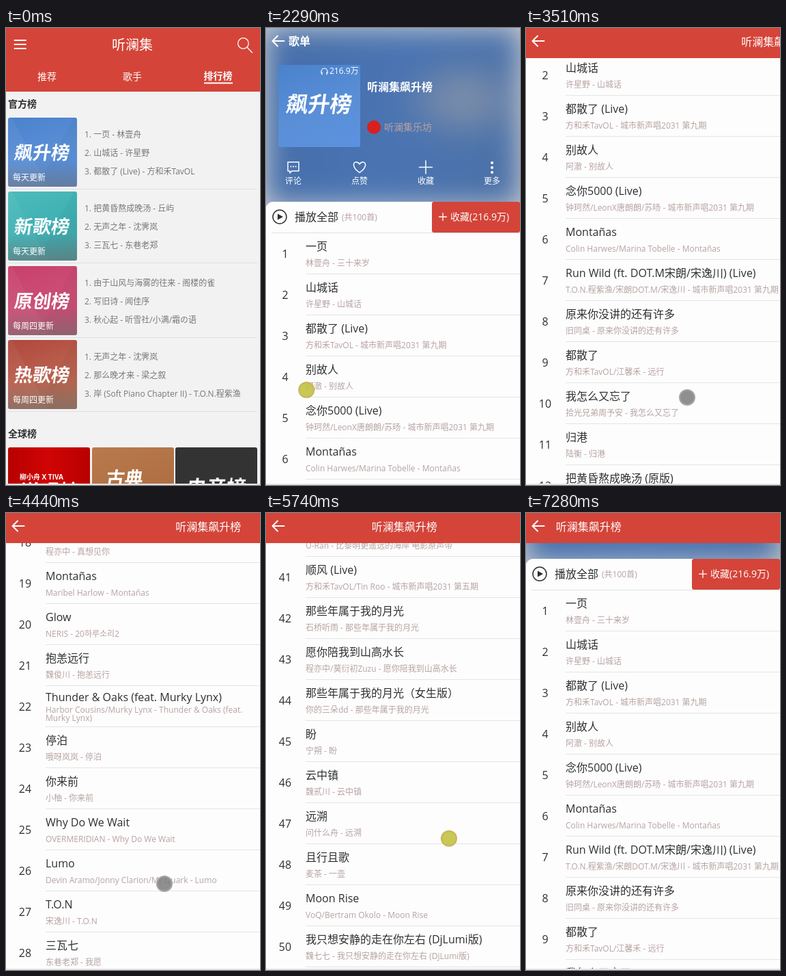
Animation of 372x668 px, one loop 7.37 s. Source, as an HTML page:

```html
<!DOCTYPE html>
<html lang="zh-CN">
<head>
<meta charset="utf-8">
<title>听澜集</title>
<style>
  :root { --loop: 7370ms; --red: #d44439; }
  html, body { margin: 0; width: 100%; height: 100%; overflow: hidden; background: #f2f2f3; }
  body { position: relative; font-family: "Open Sans", "Noto Sans CJK SC", "Noto Sans CJK", sans-serif; }
  body *, body { box-sizing: border-box; }
  #stage { position: absolute; left: 0; top: 0; width: 372px; height: 668px; overflow: hidden; }
  #stage div, #stage svg { position: absolute; }
  svg { left: 0; top: 0; fill: none; stroke: #fff; stroke-width: 1.5; stroke-linecap: round; stroke-linejoin: round; }

  /* text placed by its left edge (or middle) and vertical centre */
  .t {
    position: absolute; white-space: pre; line-height: 1;
    left: calc(var(--x) * 1px);
    top: calc((var(--y) - var(--s) / 2) * 1px);
    font-size: calc(var(--s) * 1px);
  }
  .mid { transform: translateX(-50%); }
  .bold { font-weight: 700; }
  .white { color: #fff; }
  .dark { color: #2e3030; }
  .grey { color: #777; }
  .tan { color: #b8a2a2; }

  /* chart list */
  #home { inset: 0; isolation: isolate; }
  #top { left: 0; top: 0; width: 372px; height: 93px; background: var(--red); }
  .cover { border-radius: 3px; overflow: hidden; color: #fff; isolation: isolate; }
  .shade::after {
    content: ""; position: absolute; inset: 0;
    background:
      linear-gradient(transparent 62%, #6e6e6e88),
      linear-gradient(62deg, #ffffff0b 38%, transparent 38.5%),
      linear-gradient(118deg, transparent 62%, #00000008 62.5%);
  }
  .logo { font-weight: 700; transform: translateX(-50%) skewX(-8deg); z-index: 1; }
  .rule { height: 1px; background: #dfe0e1; }

  /* song list */
  #album { inset: 0; background: #fdfdfd; overflow: hidden; isolation: isolate; transform-origin: right bottom; animation: fly var(--loop) infinite; }
  #scroller { left: 0; top: 0; width: 372px; height: 3480px; animation: scroll var(--loop) linear infinite; }
  #hero { left: 0; top: 0; width: 372px; height: 260px; overflow: hidden; background: #fff; }
  #blur {
    inset: 0; filter: blur(20px);
    background: radial-gradient(ellipse 100px 65px at 290px 105px, #a9b6cc, transparent), linear-gradient(100deg, #5585cd, #5b8dd8 50%, #5e89c9);
  }
  #tint { inset: 0; background: rgba(7, 17, 27, .2); }
  #card { left: 0; top: 254px; width: 372px; height: 3230px; background: #fdfdfd; border-radius: 10px; }
  #collect { left: 243px; top: 0; width: 129px; height: 45px; background: var(--red); border-radius: 3px; }
  .row { left: 0; width: 372px; height: 60px; }
  .info {
    left: 58px; right: 0; top: 0; height: 60px; padding: 6px 0 4px;
    border-bottom: 1px solid #e4e4e4;
    display: flex; flex-direction: column; justify-content: space-around;
    white-space: pre; line-height: 1;
  }
  .info b { font: inherit; font-size: 16px; line-height: 1; color: #2e3030; }
  .info span { font-size: 12px; color: #b8a2a2; }

  /* page header */
  .head { left: 0; top: 0; width: 372px; height: 44px; }
  #plain { animation: plain var(--loop) step-end infinite; }
  #solid { background: var(--red); animation: solid var(--loop) linear infinite; }
  #clip { left: 40px; top: 0; width: 332px; height: 44px; overflow: hidden; }
  #ticker { left: -40px; top: 0; width: 96px; height: 44px; animation: ticker var(--loop) linear infinite; }

  #edge { left: 0; top: 666px; width: 372px; height: 2px; background: #e4e4e4; }
  #touch {
    left: -12px; top: -12px; width: 24px; height: 24px; border-radius: 50%; border: 2px solid;
    animation: move var(--loop) linear infinite, show var(--loop) step-end infinite, ink var(--loop) step-end infinite;
  }

  @keyframes fly {
    0%, 10.72% { transform: rotateZ(30deg) translate3d(100%, 0, 0); animation-timing-function: ease; }
    14.93%, 100% { transform: rotateZ(0deg) translate3d(0, 0, 0); }
  }
  @keyframes scroll {
    0%, 35.55% { transform: translateY(0); }
    36.64% { transform: translateY(-45px); }
    37.313% { transform: translateY(-111px); }
    38.67% { transform: translateY(-175px); }
    41.38% { transform: translateY(-210px); animation-timing-function: ease-out; }
    47.63% { transform: translateY(-321px); }
    48.30% { transform: translateY(-325px); }
    50.47% { transform: translateY(-560px); }
    52.92% { transform: translateY(-860px); }
    56.31% { transform: translateY(-1180px); animation-timing-function: ease-out; }
    60.24% { transform: translateY(-1307px); }
    61.06% { transform: translateY(-1310px); }
    63.23% { transform: translateY(-1560px); }
    65.81% { transform: translateY(-1900px); }
    69.88% { transform: translateY(-2320px); }
    73.81% { transform: translateY(-2560px); animation-timing-function: ease-out; }
    77.88% { transform: translateY(-2636px); }
    80.87% { transform: translateY(-2640px); }
    82.77% { transform: translateY(-2450px); }
    85.48% { transform: translateY(-1950px); }
    88.87% { transform: translateY(-1250px); }
    91.59% { transform: translateY(-760px); }
    94.03% { transform: translateY(-420px); }
    96.34% { transform: translateY(-260px); }
    98.78% { transform: translateY(-187px); }
    100% { transform: translateY(-175px); }
  }
  @keyframes plain { 0% { opacity: 1; } 36.64%, 100% { opacity: 0; } }
  @keyframes solid {
    0%, 36.64% { opacity: 0; }
    37.313% { opacity: .73; }
    37.86%, 100% { opacity: 1; }
  }
  @keyframes ticker {
    0%, 36.64% { transform: translateX(373.6px); }
    100% { transform: translateX(37.4px); }
  }
  @keyframes move {
    0%, .95% { transform: translate(349px, 472px); }
    10.18%, 12% { transform: translate(205px, 187px); }
    21.57% { transform: translate(290px, 89px); }
    31.07% { transform: translate(59px, 529px); }
    35.55% { transform: translate(140px, 514px); }
    37.313% { transform: translate(151px, 403px); }
    38.67% { transform: translate(155px, 340px); }
    41.38% { transform: translate(170px, 335px); }
    47.63% { transform: translate(236px, 540px); }
    48.30% { transform: translate(236px, 536px); }
    50.47% { transform: translate(250px, 300px); }
    54% { transform: translate(255px, 290px); }
    59.5% { transform: translate(231px, 545px); }
    60.24% { transform: translate(232px, 542px); }
    61.06% { transform: translate(232px, 538px); }
    63.23% { transform: translate(245px, 290px); }
    67% { transform: translate(250px, 280px); }
    77.88% { transform: translate(268px, 477px); }
    80.87% { transform: translate(260px, 250px); }
    82.77%, 100% { transform: translate(260px, 440px); }
  }
  @keyframes show {
    0% { opacity: 0; } .95% { opacity: 1; } 10.85% { opacity: 0; }
    21.57% { opacity: 1; } 92%, 100% { opacity: 0; }
  }
  @keyframes ink {
    0% { background: #c3c343e6; border-color: #c9b15ce6; }
    35.5% { background: #aaa5aad0; border-color: #d9605a; }
    38.67% { background: #c3c343e6; border-color: #c9b15ce6; }
    47% { background: #7c7c7cd9; border-color: #a9a9a9d9; }
    51% { background: #c3c343e6; border-color: #c9b15ce6; }
    59.8% { background: #7c7c7cd9; border-color: #a9a9a9d9; }
    63.5% { background: #c3c343e6; border-color: #c9b15ce6; }
    80.6% { background: #7c7c7cd9; border-color: #a9a9a9d9; }
    83%, 100% { background: #c3c343e6; border-color: #c9b15ce6; }
  }
</style>
</head>
<body>
<div id="stage">
  <div id="home">
    <div id="top"></div>
    <svg width="372" height="93">
      <path d="M12.5 18H29M12.5 24H29M12.5 30H29" stroke-width="1.8"/>
      <circle cx="347.500" cy="22.500" r="7.800" stroke-width="1.3"/>
      <path d="M353.500 28.500L360.500 36" stroke-width="1.3"/>
      <path d="M290 80.500H332" stroke-width="2" stroke-linecap="butt"/>
    </svg>
  </div>
  <div id="album">
    <div id="scroller">
      <div id="hero">
        <div id="blur"></div>
        <div id="tint"></div>
        <svg width="372" height="260">
          <circle cx="158" cy="145" r="10" fill="#d8201f" stroke="none"/>
          <path d="M32 196H48V209H38L35 212V209H32Z"/>
          <path d="M36.500 202.500h.1M40 202.500h.1M43.500 202.500h.1" stroke-width="2"/>
          <path d="M137 211.500C126 204 127 196 132 196Q135 196 137 199Q139 196 142 196C147 196 148 204 137 211.500Z"/>
          <path d="M224.500 203.500H243.500M234 194V213"/>
          <path d="M331 197h.1M331 204h.1M331 211h.1" stroke-width="4"/>
        </svg>
      </div>
      <div id="card">
        <div id="collect"></div>
        <div class="rule" style="left:8px;top:45px;width:364px"></div>
        <svg width="372" height="45">
          <circle cx="20" cy="22" r="10" stroke="#2e3030"/>
          <path d="M17 17.500L25 22L17 26.500Z" fill="#2e3030" stroke="none"/>
          <path d="M253.500 22H264.500M259 16.500V27.500" stroke-width="1.3"/>
        </svg>
      </div>
    </div>
    <div id="plain" class="head"></div>
    <div id="solid" class="head"><div id="clip"><div id="ticker"></div></div></div>
  </div>
  <div id="touch"></div>
  <div id="edge"></div>
</div>
<script>
  const $ = id => document.getElementById(id);
  const add = (id, html) => $(id).insertAdjacentHTML("beforeend", html);
  const esc = s => s.replace(/&/g, "&amp;");
  const text = (x, y, s, str, cls = "") =>
    `<span class="t ${cls}" style="--x:${x};--y:${y};--s:${s}">${esc(str)}</span>`;
  const box = (x, y, w, h, bg, inner, cls = "") =>
    `<div class="cover ${cls}" style="left:${x}px;top:${y}px;width:${w}px;height:${h}px;background:${bg}">${inner}</div>`;
  const blue = "linear-gradient(160deg,#4a82cd,#5a8fd6 55%,#5b92e0)";

  // chart list
  const charts = [
    ["飙升榜", "每天更新", blue, ["一页 - 林壹舟", "山城话 - 许星野", "都散了 (Live) - 方和禾TavOL"]],
    ["新歌榜", "每天更新", "linear-gradient(160deg,#4dbcbb,#3fb0b3 50%,#45a0a6)",
      ["把黄昏熬成晚汤 - 丘屿", "无声之年 - 沈霁岚", "三瓦七 - 东巷老郑"]],
    ["原创榜", "每周四更新", "linear-gradient(160deg,#c8416c,#cb4d75 50%,#bd5574)",
      ["由于山风与海雾的往来 - 阁楼的雀", "写旧诗 - 闻佳序", "秋心起 - 听雪社/小满/霜の语"]],
    ["热歌榜", "每周四更新", "linear-gradient(160deg,#b1473d,#b9604e 50%,#b07558)",
      ["无声之年 - 沈霁岚", "那么晚才来 - 梁之叙", "岸 (Soft Piano Chapter II) - T.O.N.程紫渔"]],
  ];
  add("home",
    text(185, 25, 20, "听澜集", "mid white") +
    text(60, 71, 14, "推荐", "mid white") +
    text(185, 71, 14, "歌手", "mid white") +
    text(310.5, 70, 14, "排行榜", "mid white bold") +
    text(3, 111, 14, "官方榜", "bold dark") +
    text(3, 593, 14, "全球榜", "bold dark"));
  charts.forEach(([name, when, bg, songs], i) => {
    const y = 131 + Math.round(i * 108.4);
    add("home",
      box(3, y, 101, 101, bg, text(50, 50, 27, name, "logo"), "shade") +
      text(10, y + 88, 12, when, "white") +
      songs.map((s, k) => text(115, y + 25 + 27 * k, 12, `${k + 1}. ${s}`, "grey")).join("") +
      `<div class="rule" style="left:3px;top:${y + 104}px;width:365px"></div>`);
  });
  add("home",
    box(3, 613, 120, 120, "linear-gradient(90deg,#b80000,#d00404 50%,#b80000)",
      text(17, 43, 10, "柳小舟 X TIVA", "bold") + text(60, 63, 29, "说唱榜", "logo")) +
    box(126, 613, 120, 120, "linear-gradient(160deg,#b87a4c,#a9663c)", text(48, 44, 27, "古典", "logo")) +
    box(248, 613, 120, 120, "#333", text(60, 57, 29, "电音榜", "logo")));

  // song page
  const title = "听澜集飙升榜";
  add("hero",
    box(18, 54, 120, 120, blue, text(60, 57, 32, "飙升榜", "logo")) +
    text(93, 63, 12, "216.9万", "white") +
    `<svg width="372" height="80"><path d="M81 66V63.500A4.500 4.500 0 0 1 90 63.500V66M82 65V68M89 65V68" stroke-width="1.2"/></svg>` +
    text(148, 86, 16, title, "white bold") +
    text(173, 145, 14, "听澜集乐坊", "tan") +
    ["评论", "点赞", "收藏", "更多"].map((s, i) => text(40 + 97 * i, 224, 12, s, "mid white")).join(""));
  add("card",
    text(42, 22, 16, "播放全部", "dark") +
    text(111, 23, 12, "(共100首)", "tan") +
    text(270, 22, 14, "收藏(216.9万)", "white"));

  // title | artist | album (the title itself when left out)
  const show9 = "城市新声唱2031 第九期";
  const songs = `一页|林壹舟|三十来岁
山城话|许星野
都散了 (Live)|方和禾TavOL|${show9}
别故人|阿澈
念你5000 (Live)|钟珂然/LeonX唐朗朗/苏旸|${show9}
Montañas|Colin Harwes/Marina Tobelle
Run Wild (ft. DOT.M宋朗/宋逸川) (Live)|T.O.N.程紫渔/宋朗DOT.M/宋逸川|${show9}
原来你没讲的还有许多|旧同桌
都散了|方和禾TavOL/江馨禾|远行
我怎么又忘了|拾光兄弟周予安
归港|陆衡
把黄昏熬成晚汤 (原版)|丘屿
无声之年|沈霁岚
晚灯|白屿川
写旧诗|闻佳序
那么晚才来|梁之叙
雨落南窗|石桥听雨
真想见你|程亦中
Montañas|Maribel Harlow
Glow|NERIS|20하루소리2
抱恙远行|魏俊川
Thunder & Oaks (feat. Murky Lynx)|Harbor Cousins/Murky Lynx|Thunder & Oaks (feat.\nMurky Lynx)
停泊|哦呀岚岚
你来前|小柚
Why Do We Wait|OVERMERIDIAN
Lumo|Devin Aramo/Jonny Clarion/Mr Quark
T.O.N|宋逸川
三瓦七|东巷老郑|我愿
秋心起|听雪社/小满
慢车窗|白屿川
Paper Lantern|Colin Harwes
海雾来信|阁楼的雀
半盏月|宁朔
不问归期 (Live)|许星野|${show9}
街角的风|小柚
旧站台|陆衡
Slow River|NERIS
候鸟南飞|江馨禾
北岸灯火|梁之叙
有一种安静|U-Ran|比黎明更遥远的海岸 电影原声带
顺风 (Live)|方和禾TavOL/Tin Roo|城市新声唱2031 第五期
那些年属于我的月光|石桥听雨
愿你陪我到山高水长|程亦中/莫衍初Zuzu
那些年属于我的月光（女生版）|你的三朵dd|那些年属于我的月光
盼|宁朔
云中镇|魏贰川
远溯|问什么舟
且行且歌|麦茶|一壶
Moon Rise|VoQ/Bertram Okolo
我只想安静的走在你左右 (DjLumi版)|魏七七
长街尽头|阿澈
写在雨天|小柚`;
  const rows = songs.replace(/\(feat\.\n/, "(feat.~").split("\n").map((line, i) => {
    const [name, artist, album = name.replace(" (Live)", "")] = line.split("|");
    return `<div class="row" style="top:${46 + 60 * i}px">${text(28, 30, 16, String(i + 1), "mid dark")}` +
      `<div class="info"><b>${esc(name)}</b><span>${esc(`${artist} - ${album}`).replace("~", "\n")}</span></div></div>`;
  });
  add("card", rows.join(""));

  const arrow = `<svg width="44" height="44"><path d="M26.500 19H10M17 11.500L9.500 19L17 26.500" stroke-width="2"/></svg>`;
  add("plain", arrow + text(33, 19, 16, "歌单", "white bold"));
  add("solid", arrow);
  add("ticker", text(0, 19.5, 16, title, "white"));
</script>
</body>
</html>
```
